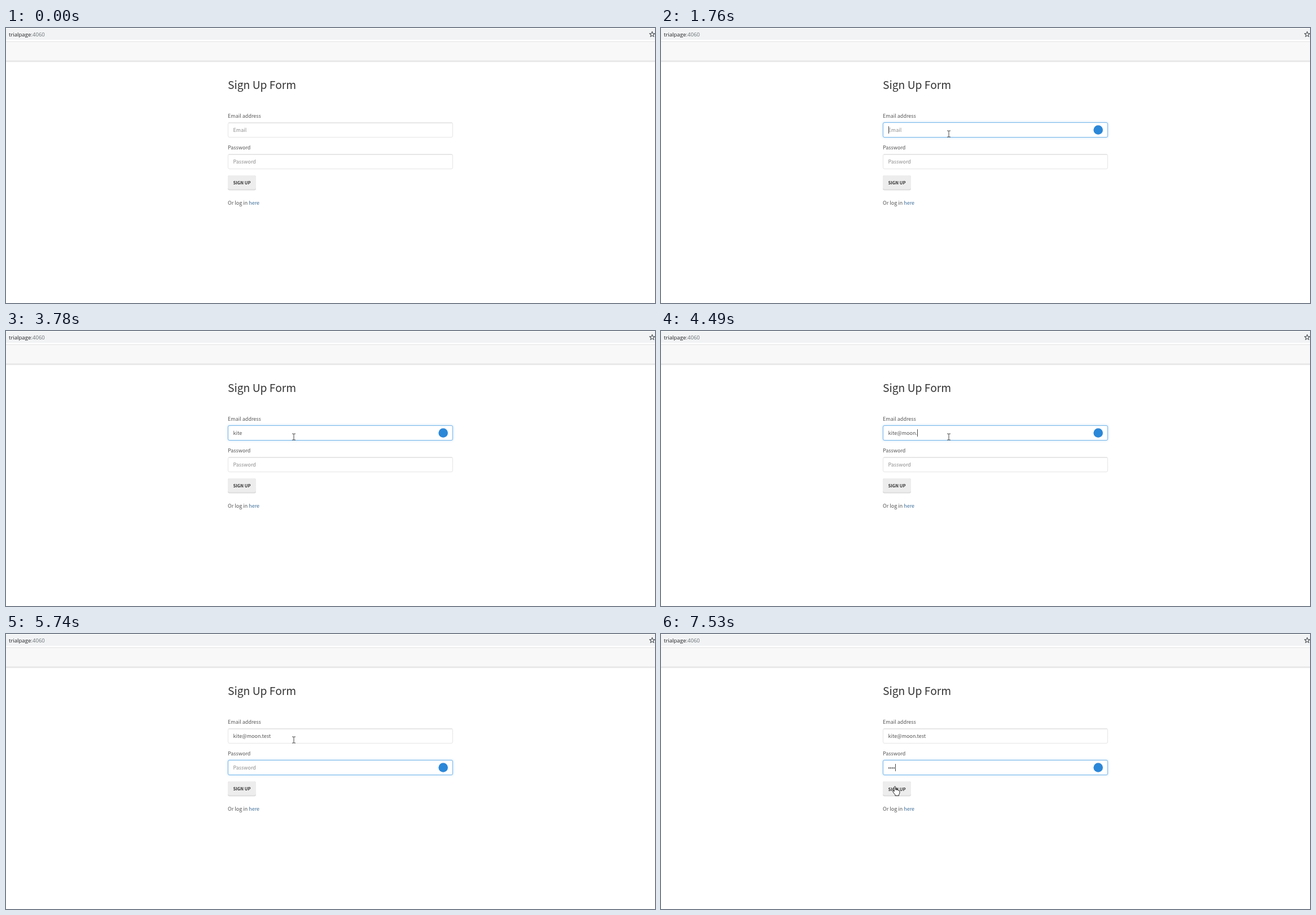
These frames come from a looping animation (1150x487 px, 8000 ms). An HTML page:

```html
<!DOCTYPE html>
<html lang="en">
<head>
<meta charset="utf-8">
<title>Sign Up Form</title>
<style>
  html, body { margin: 0; width: 100%; height: 100%; overflow: hidden; background: #fff; }
  svg { display: block; width: 100%; height: 100%; }
  text { font: 9px "Noto Sans CJK SC", "Noto Sans CJK JP", "Noto Sans CJK", "Open Sans", sans-serif; fill: #555; white-space: pre; }
  .url { font: 9.6px "Open Sans", "Noto Sans", sans-serif; fill: #202124; }
  .title { font-size: 19.25px; fill: #333; }
  .hint { fill: #8c8c8c; }
  .button { font-size: 7.7px; font-weight: 700; fill: #333; }
</style>
</head>
<body>
<svg viewBox="0 0 1150 487">
  <defs>
    <filter id="blur" x="-5%" y="-60%" width="110%" height="220%"><feGaussianBlur stdDeviation="2"/></filter>
    <g id="box">
      <rect x="393.5" y="167.5" width="398" height="26" rx="2.5" fill="#fff" stroke="#e5e5e5"/>
      <path d="M394.5 168H790.5" stroke="#e3e3e3" stroke-width="1.6"/>
    </g>
    <g id="glow">
      <rect x="393" y="167" width="399" height="27" rx="3" fill="#66afe9" opacity=".4" filter="url(#blur)"/>
      <rect x="393.5" y="167.5" width="398" height="26" rx="2.5" fill="#fff" stroke="#74b5ea"/>
    </g>
  </defs>

  <rect width="1150" height="487" fill="#fff"/>
  <rect y="1" width="1150" height="20" fill="#f1f3f4"/>
  <text class="url" x="5" y="14.5">trialpage<tspan fill="#6b6f74">:4060</tspan></text>
  <path id="star" fill="none" stroke="#4d5156" stroke-width="1.1" stroke-linejoin="round"/>
  <rect y="24" width="1150" height="34" fill="#f8f8f8"/>
  <rect y="23.5" width="1150" height="1" fill="#e2e2e2"/>
  <rect y="57.5" width="1150" height="2.7" fill="#e7e7e7"/>

  <text class="title" x="393" y="108">Sign Up Form</text>
  <text x="393" y="159.2">Email address</text>
  <text x="393" y="215.2">Password</text>

  <use href="#box"/>
  <use href="#box" y="56"/>
  <use href="#glow" id="emailGlow"/>
  <use href="#glow" id="passGlow" y="56"/>
  <text class="hint" id="emailHint" x="402.5" y="184">Email</text>
  <text class="hint" id="passHint" x="402.5" y="240">Password</text>
  <text id="email" x="402.5" y="184"></text>
  <g id="dots" fill="#444">
    <circle cx="404" cy="237.3" r="1.15"/><circle cx="407" cy="237.3" r="1.15"/>
    <circle cx="410" cy="237.3" r="1.15"/><circle cx="413" cy="237.3" r="1.15"/>
  </g>
  <rect id="caret" width="1" height="13" fill="#444"/>
  <circle id="badge" cx="774.7" r="8.3" fill="#2b87d8"/>

  <rect x="393" y="261" width="50" height="26.5" rx="3" fill="#dedede"/>
  <rect x="393" y="261" width="50" height="24.3" rx="3" fill="#ededed"/>
  <text class="button" id="label" x="402.5" y="276.7">SIGN UP</text>
  <text x="393" y="312.5">Or log in <tspan fill="#42719c">here</tspan></text>

  <circle id="halo" cx="516.5" cy="185.5" r="10.3" fill="#fbf64a" opacity=".9"/>
  <g id="pointer">
    <path id="arrow" d="M0 0V11.2l2.6-2.4 1.7 4 1.8-.8-1.7-3.9H8Z" fill="#fff" stroke="#222" stroke-width=".9"/>
    <path id="beam" d="M-3-5.5H-1Q0-5.5 0-4.5Q0-5.5 1-5.5H3M0-4.5V4.5M-3 5.5H-1Q0 5.5 0 4.5Q0 5.5 1 5.5H3" fill="none" stroke="#444"/>
    <path id="hand" d="M-1.3 7V.2Q-1.2-1.1 0-1.1T1.3.2V5Q2.4 3.9 3.6 5.3Q5-.1 4.6 5.1Q6 4.8 6.2 6.2Q8.3 5.4 8.4 7.5V10.2Q8.3 12.2 7 13.3V15.3H.4V13.6Q-2 11.2-3.8 7.8Q-4.2 6.4-2.8 6.3Q-1.9 6.6-1.3 7.8Z" fill="#fff" stroke="#222"/>
  </g>
</svg>
<script>
const $ = id => document.getElementById(id);
const show = (id, on) => $(id).setAttribute('visibility', on ? 'visible' : 'hidden');
const set = (id, name, value) => $(id).setAttribute(name, value);
const clamp = v => Math.max(0, Math.min(1, v));
const smooth = v => v * v * (3 - 2 * v);
const mix = (a, b, p) => a + (b - a) * p;

const LOOP = 8000, CLICK = 690, TAB = 5190, FADE = 150, BLINK = 530;
const address = 'kite@moon.test';
const emailKeys = [2150, 2150, 2290, 2460, 3850, 4080, 4170, 4330, 4410, 4490, 4730, 4810, 4960, 5040];
const passKeys = [6060, 6120, 6290, 6530];
const wakes = [CLICK, ...emailKeys, 3240, TAB, ...passKeys, 7530].sort((a, b) => a - b);
const before = (times, t) => times.filter(k => k <= t).length;

const starPoints = Array.from({ length: 10 }, (_, i) => {
  const a = i * Math.PI / 5, r = i % 2 ? 2.1 : 5;
  return `${(1145 + r * Math.sin(a)).toFixed(2)} ${(11.3 - r * Math.cos(a)).toFixed(2)}`;
});
set('star', 'd', `M${starPoints.join('L')}Z`);

function pointerAt(t) {
  if (t < 980) {
    const p = smooth(clamp(Math.floor((t - 210) / 75) / 6));
    return [mix(854, 517.5, p), mix(338, 186, p)];
  }
  const p = t < 7070 ? 0 : smooth(clamp((Math.floor((t - 7070) / 76.6) + 1) / 7));
  return [mix(510, 414.5, p), mix(187.5, 271, p)];
}

function drawPointer(t) {
  const [x, y] = pointerAt(t);
  const inField = x > 393 && x < 792 && (y > 167 && y < 194 || y > 223 && y < 250);
  const onButton = x > 393 && x < 443 && y > 261 && y < 287;
  const shape = onButton ? 'hand' : inField ? 'beam' : 'arrow';
  for (const id of ['arrow', 'beam', 'hand']) show(id, t >= 210 && id === shape);
  set('pointer', 'transform', `translate(${x.toFixed(1)} ${y.toFixed(1)})`);
  set('label', 'y', onButton ? 277.5 : 276.7);
  show('halo', t >= 675 && t < 810);
}

function draw(t) {
  const typed = before(emailKeys, t), hidden = before(passKeys, t);
  const focused = t >= CLICK, inPass = t >= TAB;

  $('email').textContent = address.slice(0, typed);
  show('emailHint', !typed);
  show('passHint', !hidden);
  [...$('dots').children].forEach((dot, i) => dot.setAttribute('visibility', i < hidden ? 'visible' : 'hidden'));

  const toPass = smooth(clamp((t - TAB) / FADE));
  set('emailGlow', 'opacity', smooth(clamp((t - CLICK) / FADE)) * (1 - toPass));
  set('passGlow', 'opacity', toPass);

  const wake = wakes[before(wakes, t) - 1];
  const lit = focused && Math.floor((t - wake) / BLINK) % 2 === 0;
  const end = typed ? Math.round(402.5 + $('email').getComputedTextLength()) : 403;
  set('caret', 'x', inPass ? 403 + hidden * 3 : end);
  set('caret', 'y', inPass ? 230 : 174);
  show('caret', lit);
  set('badge', 'cy', inPass ? 236.5 : 180.5);
  show('badge', focused);

  drawPointer(t);
}

const start = performance.now();
(function tick() {
  draw((performance.now() - start) % LOOP);
  requestAnimationFrame(tick);
})();
</script>
</body>
</html>
```
